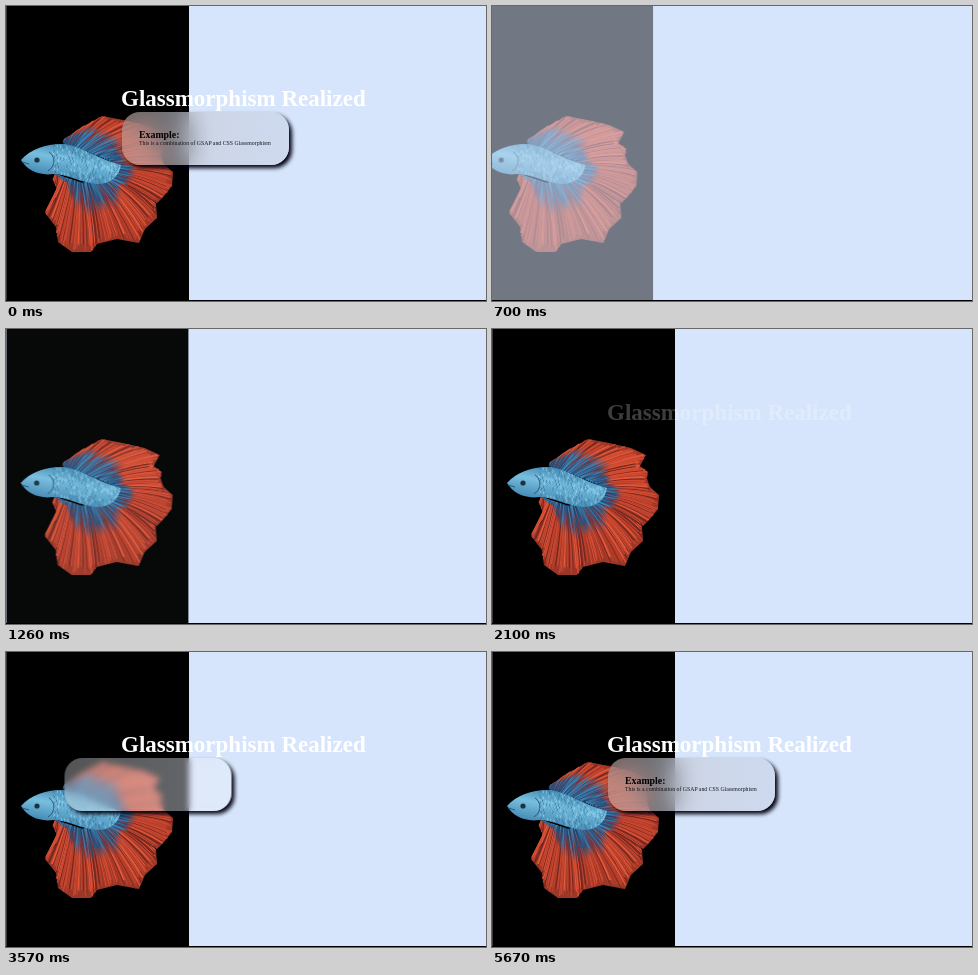
Write an HTML page with a canvas that moves like this. It is 480x295 px and loops after 6.02 s.

```html
<!DOCTYPE html>
<html lang="en">
<head>
<meta charset="utf-8">
<title>Glassmorphism Realized</title>
<style>
  html, body { margin: 0; width: 100%; height: 100%; overflow: hidden; background: #d7e5fc; }
  body { position: relative; font-family: "Liberation Serif", "Times New Roman", serif; }
  body *, body::after { position: absolute; }
  body::after { content: ""; left: 0; top: 294px; width: 480px; height: 1px; background: #000; }
  #photo { left: 0; top: 0; border-left: 1px solid #3a3a3e; box-sizing: border-box; }
  h1, h2, p { margin: 0; line-height: 1; white-space: nowrap; }
  h1 { left: 115px; top: 80.7px; font-size: 23px; color: #fff; }
  #card { left: 116px; top: 106px; width: 167px; height: 53px; border-radius: 18px;
    box-shadow: 3px 3px 4px #000010; }
  h2 { left: 17px; top: 17.7px; font-size: 9.85px; color: #000; }
  p { left: 17px; top: 29.1px; font-size: 5.8px; color: #14161c; }
</style>
</head>
<body>
<canvas id="photo" width="182" height="294"></canvas>
<h1>Glassmorphism Realized</h1>
<div id="card">
  <h2>Example:</h2>
  <p>This is a combination of GSAP and CSS Glassmorphism</p>
</div>
<script>
const $ = s => document.querySelector(s);
const photo = $('#photo'), title = $('h1'), card = $('#card'), heading = $('h2'), note = $('p');
const c = photo.getContext('2d');
const clamp = v => Math.min(1, Math.max(0, v));
const mix = (a, b, u) => a + (b - a) * u;

let seed = 7;
const rand = () => (seed = seed * 16807 % 2147483647) / 2147483647;
const pick = list => list[Math.floor(rand() * list.length)];

// Point at fraction u of a polyline
function along(points, u) {
  const s = u * (points.length - 1), i = Math.min(Math.floor(s), points.length - 2);
  return [0, 1].map(k => mix(points[i][k], points[i + 1][k], s - i));
}

// A fin: rays fanning from a base line to an outer edge, blue at the root and red at the tip
function fin(base, edge, rays, bend, blue) {
  c.beginPath();
  [...base, ...edge.slice().reverse()].forEach(([x, y]) => c.lineTo(x, y));
  c.fillStyle = '#9c3626';
  c.fill();
  for (let i = 0; i < rays; i++) {
    const u = (i + rand()) / rays, [ax, ay] = along(base, u), [bx, by] = along(edge, u);
    const len = 0.88 + rand() * 0.13, ex = mix(ax, bx, len), ey = mix(ay, by, len);
    const tint = c.createLinearGradient(ax, ay, ex, ey), root = blue(u);
    const tip = pick(['#e5593a', '#d24b31', '#b93d2a', '#c9462e', '#742620']);
    tint.addColorStop(0, pick(['#3e8cbd', '#275f8f', '#1d3f68']));
    tint.addColorStop(root * 0.6, pick(['#3680b5', '#27507d', '#6e3340']));
    tint.addColorStop(root, tip);
    tint.addColorStop(1, tip);
    c.strokeStyle = tint;
    c.lineWidth = 0.6 + rand() * 1.1;
    c.beginPath();
    c.moveTo(ax, ay);
    c.quadraticCurveTo((ax + ex) / 2 + bend[0], (ay + ey) / 2 + bend[1], ex, ey);
    c.stroke();
  }
}

function drawFish() {
  c.fillRect(0, 0, 182, 294);
  fin([[48, 168], [75, 177], [108, 171]],
    [[46, 174], [52, 188], [38, 207], [49, 221], [51, 236], [65, 246], [84, 246], [90, 238],
     [110, 233], [132, 237], [138, 223], [150, 212], [149, 198]],
    130, [2, -4], u => 0.12 + 0.45 * Math.max(0, Math.sin((u - 0.25) * 4.2)));
  fin([[104, 155], [112, 163], [106, 173]],
    [[154, 150], [157, 158], [166, 166], [165, 180], [157, 190], [150, 197]],
    60, [2, -3], () => 0.35);
  fin([[56, 137], [80, 145], [106, 156]],
    [[60, 133], [75, 121], [95, 110], [116, 114], [138, 119], [153, 126], [147, 137], [155, 143], [153, 154]],
    90, [-2, -3], u => mix(0.88, 0.3, u));

  const skin = c.createLinearGradient(60, 136, 52, 178);
  skin.addColorStop(0, '#397fa9');
  skin.addColorStop(0.4, '#78bfdf');
  skin.addColorStop(1, '#3478a5');
  c.fillStyle = skin;
  c.beginPath();
  c.moveTo(14, 154);
  c.bezierCurveTo(24, 142, 42, 137, 58, 138);
  c.bezierCurveTo(78, 142, 94, 154, 114, 159);
  c.bezierCurveTo(112, 170, 104, 178, 90, 178);
  c.bezierCurveTo(74, 177, 62, 168, 46, 168);
  c.bezierCurveTo(32, 170, 20, 164, 14, 154);
  c.fill();
  c.save();
  c.clip();
  c.lineWidth = 0.6;
  for (let x = 46; x < 116; x += 3.2)
    for (let y = -17; y < 18; y += 3) {
      c.strokeStyle = pick(['#a6dcef', '#2c6992', '#4d9cc4']);
      c.beginPath();
      c.arc(x + y % 2, 153 + (x - 46) * 0.24 + y, 1.5, -1.3, 1.3);
      c.stroke();
    }
  c.restore();
  c.strokeStyle = '#285976';
  c.lineWidth = 1;
  c.beginPath();
  c.arc(36, 155, 11, -1, 1.1);
  c.moveTo(15, 156);
  c.lineTo(22, 158);
  c.stroke();
  c.fillStyle = '#1b3340';
  c.beginPath();
  c.arc(30, 154, 2.6, 0, 7);
  c.fill();
}

const LOOP = 6020, STEP = 70, LAST = 5670;

// Decelerating entrance: fades in while the offset settles to zero
function enter(el, t, start, axis, from) {
  const left = 1 - clamp((t - start) / 1500);
  el.style.opacity = 1 - left ** 5;
  el.style.transform = `translate${axis}(${from * left ** 7.4}px)`;
}

function render(t) {
  enter(photo, t, 520, 'X', -56);
  enter(title, t, 2020, 'Y', -13);
  enter(heading, t, 3940, 'Y', -10);
  enter(note, t, 4320, 'Y', -11);

  const p = clamp((t - 3270) / 1040);
  const slide = p < 0.5 ? 2 * p * p : 1 - 2 * (1 - p) ** 2;
  const glass = (a, b) => a.map((v, i) => mix(v, b[i], slide)).join();
  card.style.opacity = 1 - (1 - clamp((t - 3020) / 1000)) ** 5;
  card.style.transform = `translateX(${-69 * (1 - slide)}px)`;
  card.style.backdropFilter = `blur(${mix(1.5, 13, slide)}px)`;
  card.style.background = `linear-gradient(90deg, rgba(${glass([225, 230, 235, 0.36], [196, 192, 194, 0.5])}),
    rgba(${glass([240, 245, 255, 0.4], [202, 213, 234, 0.75])}))`;
}

function frame(now) {
  const t = Math.min(Math.floor(now % LOOP / STEP) * STEP, LAST);
  render(t < STEP ? LAST + STEP : t);
  requestAnimationFrame(frame);
}

drawFish();
render(LAST + STEP);
requestAnimationFrame(frame);
</script>
</body>
</html>
```
